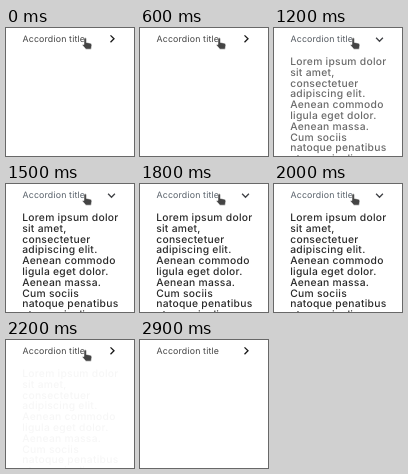
An HTML page that plays this animation: 128x128 px, repeating every 3 s.

```html
<!DOCTYPE html>
<html lang="en">
<head>
<meta charset="utf-8">
<title>Accordion</title>
<style>
  html, body { margin: 0; width: 100%; height: 100%; overflow: hidden; background: #fff; }
  svg { display: block; width: 100vw; height: 100vh; }
  text { font-family: Inter, "Open Sans", sans-serif; text-rendering: geometricPrecision; }
  #title { font-size: 8.8px; letter-spacing: .16px; }
  #body { font-size: 10.3px; font-weight: 500; letter-spacing: .27px; fill: #2a2a2a; }
  #chevron { fill: none; stroke-width: 1.3; }
  #hand { fill: #444; stroke: #fff; stroke-width: .5; }
</style>
</head>
<body>
<svg viewBox="0 0 128 128">
  <text id="title" x="16.5" y="13.5">Accordion title</text>
  <path id="chevron" d="M-1-3.4 2.5 0-1 3.4"/>
  <g id="body"></g>
  <path id="hand" d="M78 11.2q0-1.4 1.2-1.4t1.2 1.4v3.2l4 .8q1.6.4 1.4 2l-.7 4h-5.2l-3.4-4q-.4-1.2 1.5-.6z"/>
</svg>
<script>
  const LOOP = 3000, STEP = 100;
  const LINES = ["Lorem ipsum dolor", "sit amet,", "consectetuer", "adipiscing elit.",
    "Aenean commodo", "ligula eget dolor.", "Aenean massa.", "Cum sociis",
    "natoque penatibus", "et magnis dis"];
  const [title, chevron, body, hand] =
    ["title", "chevron", "body", "hand"].map(id => document.getElementById(id));

  LINES.forEach((line, i) => {
    const row = document.createElementNS("http://www.w3.org/2000/svg", "text");
    row.setAttribute("x", 16.2);
    row.setAttribute("y", 37 + i * 10.8);
    row.textContent = line;
    body.append(row);
  });

  // Smooth 0..1 ramp between two times
  const ramp = (t, from, to) => {
    const p = Math.min(1, Math.max(0, (t - from) / (to - from)));
    return p * p * (3 - 2 * p);
  };
  const blend = (a, b, p) => `rgb(${a.map((v, i) => Math.round(v + (b[i] - v) * p))})`;

  function draw(now) {
    const t = Math.floor(now % LOOP / STEP) * STEP;
    const turn = ramp(t, 700, 1000) - ramp(t, 2000, 2200);
    const open = ramp(t, 850, 1400) - ramp(t, 2000, 2225);

    chevron.setAttribute("transform", `translate(105.5 10.8) rotate(${90 * turn})`);
    chevron.setAttribute("stroke", blend([24, 24, 24], [64, 66, 70], turn));
    title.setAttribute("fill", blend([68, 68, 68], [88, 97, 106], open));
    body.setAttribute("opacity", open);
    hand.setAttribute("opacity", 1 - ramp(t, 2300, 2700));
    requestAnimationFrame(draw);
  }
  draw(performance.now());
</script>
</body>
</html>
```
